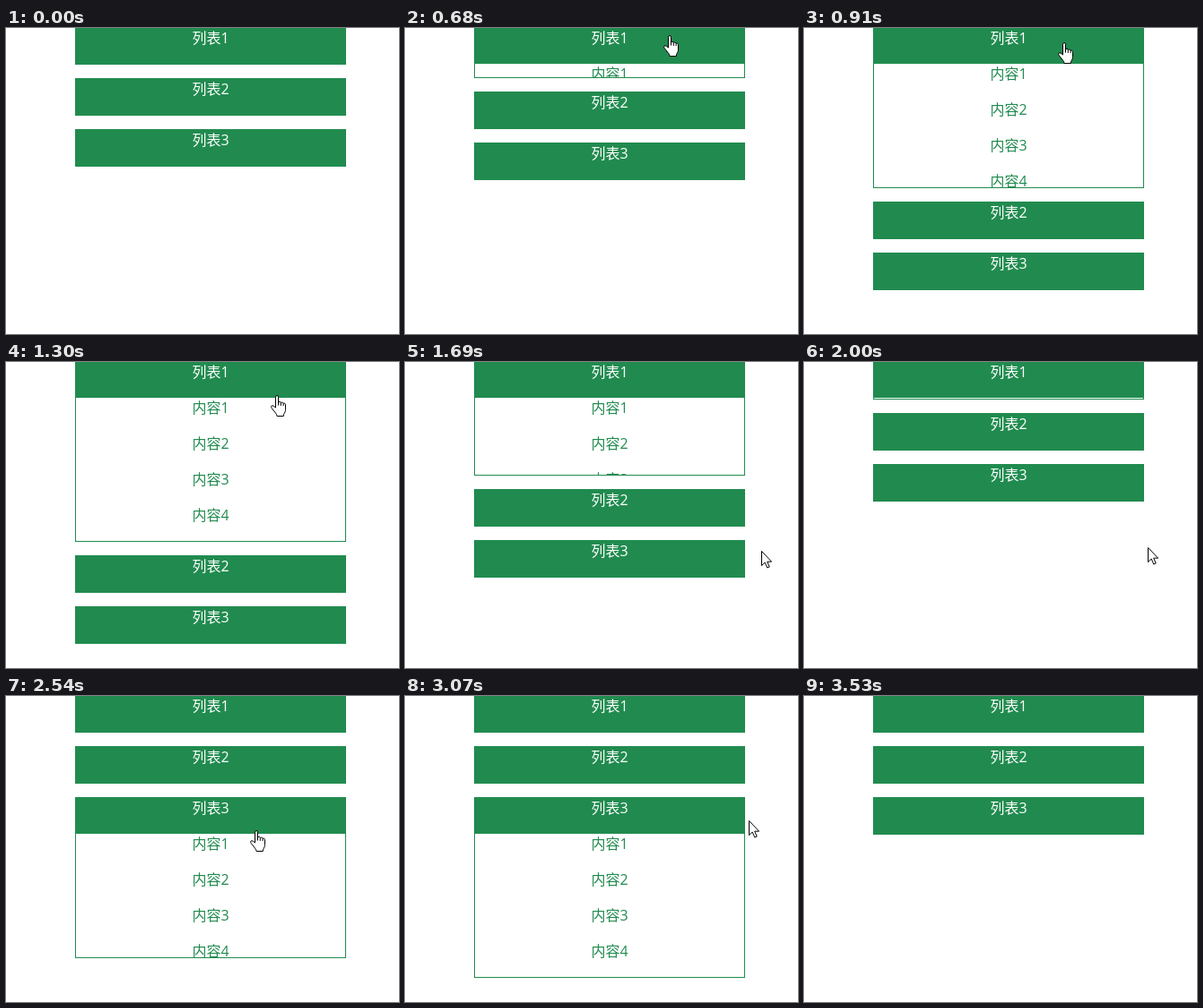
An HTML page that plays this animation: 438x342 px, repeating every 3780 ms.

```html
<!DOCTYPE html>
<html lang="zh-CN">
<head>
<meta charset="utf-8">
<title>列表</title>
<style>
  html, body { margin: 0; width: 100%; height: 100%; overflow: hidden; background: #fff; }
  body { position: relative; --green: #218b4f; }
  ul { list-style: none; margin: 0; padding: 0; }
  #menu {
    position: absolute; left: 77px; top: -1px; width: 302px;
    font: 16px/22px "Open Sans", "Noto Sans CJK SC", "Noto Sans CJK", sans-serif;
    text-align: center;
  }
  #menu > li { margin-bottom: 15px; }
  .head { height: 39px; padding-top: 1px; background: var(--green); color: #fff; font-weight: 500; }
  .panel { height: 0; overflow: hidden; border: 1px solid var(--green); color: var(--green); }
  .panel li { height: 40px; }
  svg { position: absolute; left: 0; top: 0; width: 20px; height: 26px; overflow: visible; }
  path { fill: #fff; stroke: #000; stroke-width: 1; stroke-linejoin: round; }
</style>
</head>
<body>
<ul id="menu"></ul>
<svg id="cursor">
  <g id="hand" transform="translate(-6 0)">
    <path d="M5.5 14V2.2Q5.5.5 7 .5T8.5 2.2V8q.2-.8 1.4-.7 1.3.1 1.4 1.3q.3-.6 1.4-.5 1.3.2 1.4 1.4q.3-.5 1.1-.4 1.3.2 1.3 1.6V16.5q0 2-1.4 4-.8 1.2-.8 3H7q0-1.8-1.5-3.4L1.2 14.6Q.2 13 .9 12.2 1.9 11.2 3.2 12.2Z"/>
    <path d="M8.5 8v3.5M11.3 8.6v3.3M14.1 9.5v2.6"/>
  </g>
  <path id="arrow" d="M.5.5V16.6L4.2 13.1 6.8 19 9.2 18 6.7 12.2H11.6Z"/>
</svg>
<script>
const LOOP = 3780, FIRST = 680, TICK = 77, LEAD = 8;
const SLIDE = 495, FULL = 160, GONE = 3200;

const hovers = [
  { item: 0, enter: 630, leave: 1545 },
  { item: 2, enter: 2248, leave: 3067 }
];

// Pointer: where it appears, then each straight move
const origin = { x: 294, y: 8 };
const moves = [
  { from: 680, to: 840, x: 289, y: 16 },
  { from: 1250, to: 1680, x: 397, y: 211 },
  { from: 1680, to: 1985, x: 384, y: 208 },
  { from: 1985, to: 2290, x: 278, y: 150 },
  { from: 2950, to: 3110, x: 422, y: 135 }
];

const $ = id => document.getElementById(id);
const lines = [1, 2, 3, 4].map(n => `<li>内容${n}</li>`).join('');
$('menu').innerHTML = [1, 2, 3].map(n =>
  `<li><div class="head">列表${n}</div><ul class="panel">${lines}</ul></li>`).join('');
const panels = document.querySelectorAll('.panel');

const clamp = v => Math.min(1, Math.max(0, v));

// CSS "ease": cubic-bezier(.25, .1, .25, 1), solved by bisection
function ease(x) {
  if (x <= 0 || x >= 1) return clamp(x);
  let lo = 0, hi = 1, s;
  for (let i = 0; i < 24; i++) {
    s = (lo + hi) / 2;
    if (.75 * s * (1 - s) + s ** 3 < x) lo = s; else hi = s;
  }
  return .3 * s * (1 - s) ** 2 + 3 * (1 - s) * s * s + s ** 3;
}

const slide = (t, start) => ease((t - start) / SLIDE);

function pointerAt(t) {
  let { x, y } = origin;
  for (const m of moves) {
    const k = clamp((t - m.from) / (m.to - m.from));
    x += (m.x - x) * k;
    y += (m.y - y) * k;
  }
  return [Math.round(x), Math.round(y)];
}

function draw(now) {
  // The screen refreshes in even steps
  const t = FIRST + TICK * Math.floor((now - FIRST + LEAD) / TICK);

  for (const { item, enter, leave } of hovers) {
    const height = Math.round(FULL * (slide(t, enter) - slide(t, leave)));
    panels[item].style.height = height + 'px';
  }

  const [x, y] = pointerAt(t);
  const over = hovers.some(h => t >= h.enter && t < h.leave);
  $('cursor').style.display = t >= FIRST && t < GONE ? 'block' : 'none';
  $('cursor').style.transform = `translate(${x}px, ${y}px)`;
  $('hand').style.display = over ? '' : 'none';
  $('arrow').style.display = over ? 'none' : '';
}

const start = performance.now();
function frame() {
  draw((performance.now() - start) % LOOP);
  requestAnimationFrame(frame);
}
frame();
</script>
</body>
</html>
```
